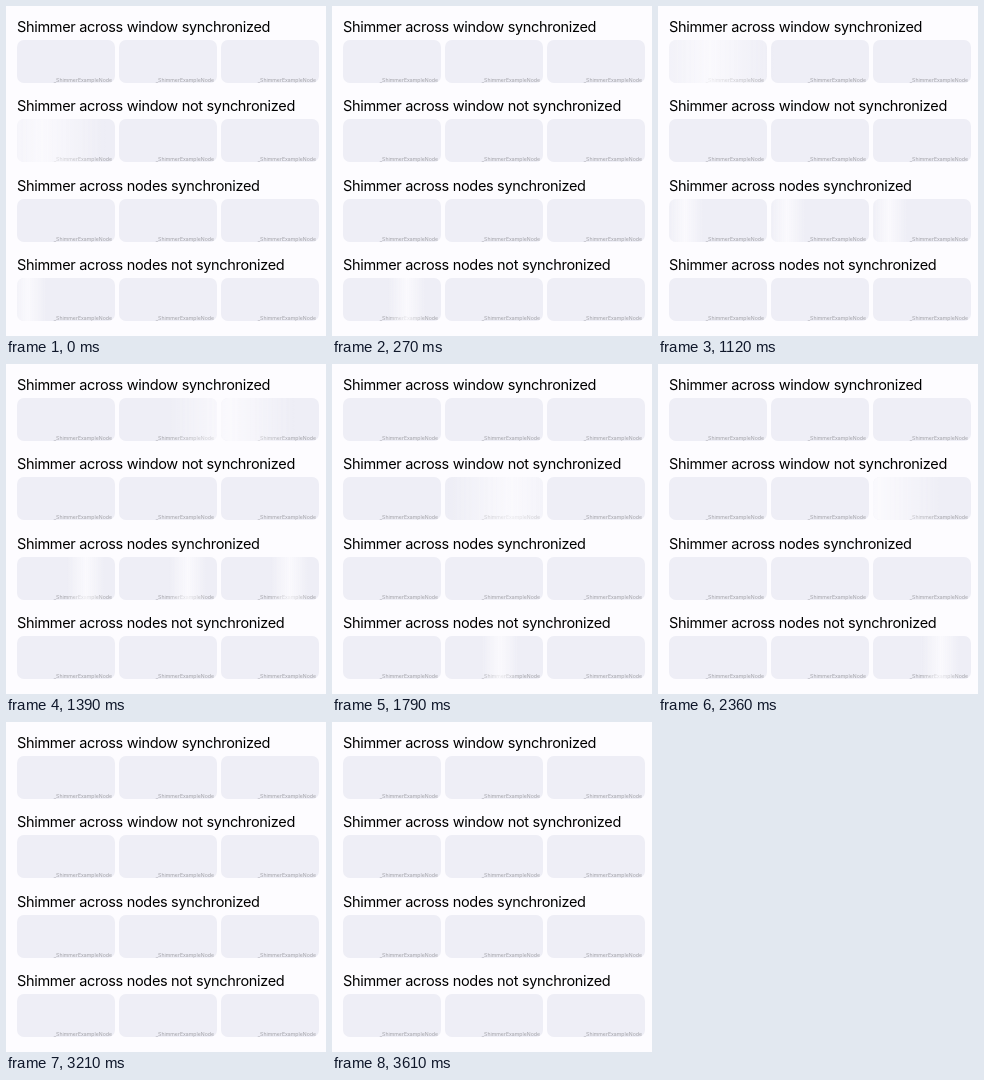
These frames come from a looping animation (320 by 330 pixels, 3670 ms). An HTML page:

```html
<!DOCTYPE html>
<html lang="en">
<head>
<meta charset="utf-8">
<title>Shimmer</title>
<style>
  html, body {
    margin: 0;
    width: 100%;
    height: 100%;
    overflow: hidden;
    background: #fdfcff;
    font-family: Inter, "Liberation Sans", sans-serif;
  }
  .row {
    position: absolute;
    left: 0;
    width: 320px;
    height: 79px;
  }
  .title {
    position: absolute;
    left: 11px;
    top: 12px;
    font-size: 14.5px;
    line-height: 18px;
    letter-spacing: -.32px;
    white-space: nowrap;
    color: #000;
  }
  .node {
    position: absolute;
    top: 34px;
    left: var(--x);
    width: 98px;
    height: 43px;
    border-radius: 7px;
    overflow: hidden;
    background: #eeeef6;
  }
  .label {
    position: absolute;
    right: 3px;
    bottom: 0;
    font-size: 5.2px;
    line-height: 6px;
    color: #a0a0a6;
  }
  /* The highlight spans 0.4 of its track and crosses one track per 500 ms. */
  .node::after {
    content: "";
    position: absolute;
    top: 0;
    bottom: 0;
    left: var(--origin);
    width: calc(var(--track) * .4);
    background: linear-gradient(90deg, #fdfcff00, #fdfcffcc, #fdfcff00);
    animation: sweep 3670ms linear infinite;
  }
  @keyframes sweep {
    from { transform: translateX(calc(var(--track) * (var(--phase) - .2))); }
    to { transform: translateX(calc(var(--track) * (var(--phase) + 7.14))); }
  }
</style>
</head>
<body>
<script>
  const STEP_MS = 500;
  const SYNCED = [1040, 1040, 1040];
  const STAGGERED = [-55, 1510, 2015];

  const rows = [
    { name: "window synchronized", starts: SYNCED, wide: true },
    { name: "window not synchronized", starts: STAGGERED, wide: true },
    { name: "nodes synchronized", starts: SYNCED },
    { name: "nodes not synchronized", starts: STAGGERED }
  ];

  function add(parent, className, text = "") {
    const el = document.createElement("div");
    el.className = className;
    el.textContent = text;
    parent.append(el);
    return el;
  }

  rows.forEach(({ name, starts, wide }, i) => {
    const row = add(document.body, "row");
    row.style.top = Math.round(i * 79.4) + "px";
    add(row, "title", "Shimmer across " + name);

    starts.forEach((start, col) => {
      const x = 11 + col * 102;
      const node = add(row, "node");
      node.style.setProperty("--x", x + "px");
      node.style.setProperty("--track", wide ? "320px" : "98px");
      node.style.setProperty("--origin", wide ? -x + "px" : "0px");
      node.style.setProperty("--phase", -start / STEP_MS);
      add(node, "label", "_ShimmerExampleNode");
    });
  });
</script>
</body>
</html>
```
